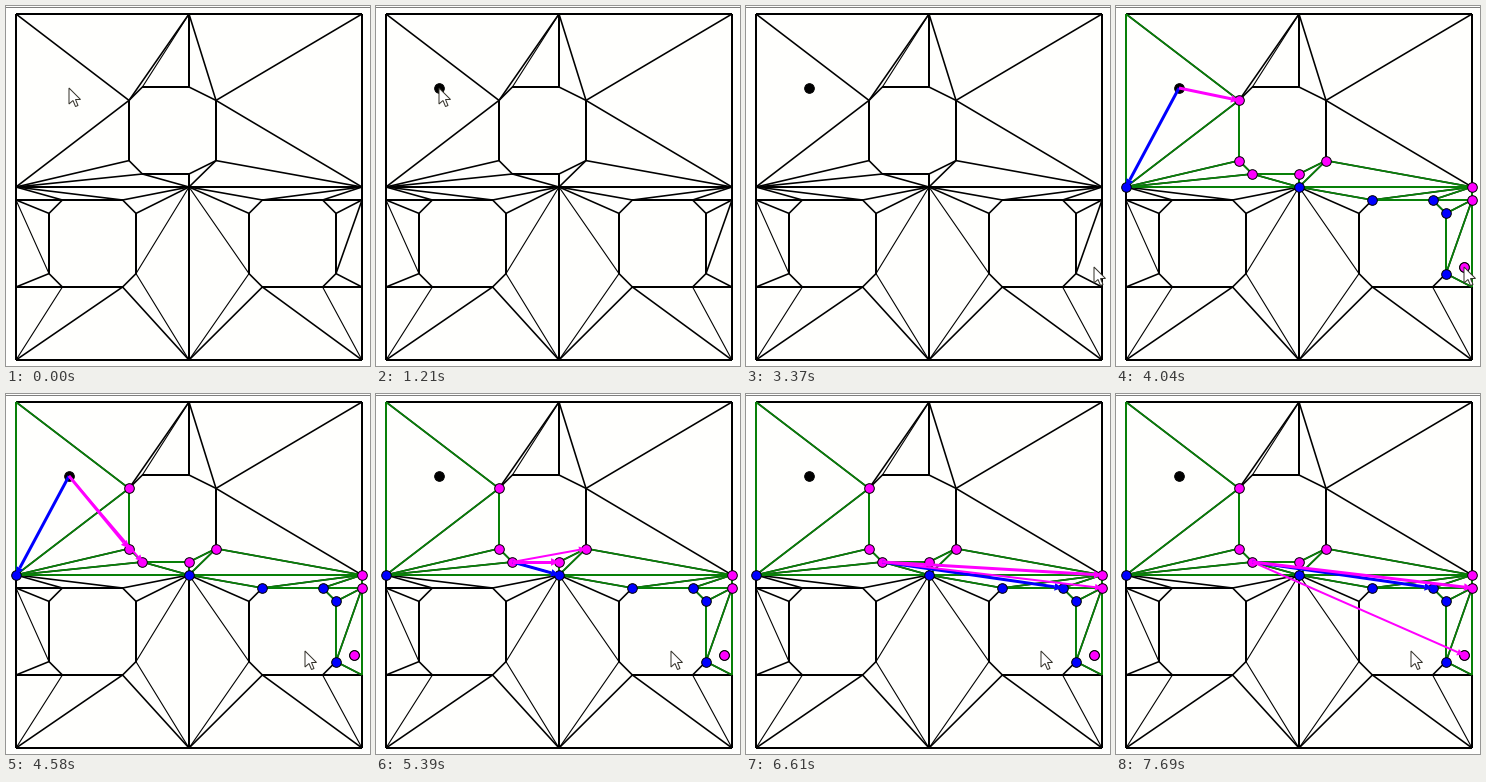
Animation of 364x360 px, one loop 8 s. Source, as a matplotlib script:

```python
import math
import matplotlib.pyplot as plt
from matplotlib.animation import FuncAnimation
from matplotlib.collections import LineCollection

W, H, DPI = 364, 360, 100
PX = 72 / DPI
LOOP, STEP = 8000, 20

PAPER, INK, GREEN = "#fffffd", "#000000", "#088008"
BLUE, PINK = "#0000ff", "#ff00ff"

START_AT, GOAL_AT, CORRIDOR_AT = 1210, 3420, 3690
PROBE_AT, PROBE_EVERY = 4056, 316

# The square is a 2 x 2 grid of nodes
X0, Y0, HALF = 10, 8, 173
(TL, TM, TR), (ML, MID, MR), (BL, BM, BR) = [
    [(X0 + c * HALF, Y0 + r * HALF) for c in range(3)] for r in range(3)]
START, GOAL = (63, 82), (348, 261)


def octagon(x, y, right_cut=13.4, size=87, cut=13.4):
    """Bevelled square, clockwise from the upper left side."""
    r, b = x + size, y + size
    return [(x, y + cut), (x + cut, y), (r - right_cut, y), (r, y + cut),
            (r, b - cut), (r - right_cut, b), (x + cut, b), (x, b - cut)]


TOP = octagon(123, 81, right_cut=27)
LEFT, RIGHT = octagon(43, 194), octagon(243, 194)
(LU, LD), (RU, RD) = [[(x, y) for y in (194, 281)] for x in (ML[0], MR[0])]


def chain(*points):
    return list(zip(points, points[1:]))


def ring(points):
    return chain(*points, points[0])


def fan(hub, *points):
    return [(hub, p) for p in points]


THICK = (
    ring([TL, TR, BR, BL]) + ring(TOP) + ring(LEFT) + ring(RIGHT)
    + chain(ML, MID, MR) + chain(MID, BM)
    + fan(TOP[0], TL, ML, TM) + fan(TM, TOP[2], TOP[3])
    + fan(TOP[3], TR, MR) + fan(ML, TOP[7], TOP[6], LEFT[1], LEFT[2])
    + fan(MID, *TOP[4:7], *LEFT[2:4], *RIGHT[:2])
    + fan(MR, TOP[4], *RIGHT[1:3])
    + fan(LU, *LEFT[:2]) + fan(LD, *LEFT[6:])
    + fan(RU, *RIGHT[2:5]) + fan(RD, *RIGHT[4:6])
    + fan(LEFT[5], BL, BM) + fan(RIGHT[6], BM, BR)
)
THIN = (
    chain(TM, TOP[1]) + chain(LU, LEFT[7]) + chain(BL, LEFT[6])
    + chain(BR, RIGHT[5]) + fan(LEFT[4], MID, BM) + fan(RIGHT[7], MID, BM)
)

# Each new corner replaces the pink or the blue end of the previous portal
BLUE_NODES = [ML, MID, *RIGHT[1:5]]
CORNERS = [TOP[7], TOP[6], MID, TOP[5], TOP[4], MR, *RIGHT[1:3],
           RU, *RIGHT[3:5], GOAL]
PORTALS = [(TOP[0], ML)]
for corner in CORNERS:
    pink, blue = PORTALS[-1]
    PORTALS.append((pink, corner) if corner in BLUE_NODES else (corner, blue))
PINK_NODES = [TOP[0]] + [c for c in CORNERS if c not in BLUE_NODES]
CORRIDOR = (PORTALS[:-1] + chain(*PINK_NODES[:-1]) + chain(*BLUE_NODES)
            + chain(TOP[0], TL, ML) + chain(RIGHT[4], RD, RU))


def cross(origin, a, b):
    return ((a[0] - origin[0]) * (b[1] - origin[1])
            - (a[1] - origin[1]) * (b[0] - origin[0]))


def funnel_steps():
    """String pulling: yields apex, pink side, blue side, probe, its colour."""
    apex, sides, i = START, list(PORTALS[0]), 1
    yield apex, *sides, None, None
    while True:
        side = int(PORTALS[i][0] == PORTALS[i - 1][0])
        probe, other = PORTALS[i][side], sides[1 - side]
        yield apex, *sides, probe, (PINK, BLUE)[side]
        if probe == GOAL:
            return
        sign = 1 - 2 * side
        if sign * cross(apex, sides[side], probe) >= 0:
            if sign * cross(apex, other, probe) > 0:
                # The sides crossed: restart just past the crossed corner
                apex = other
                i = 1 + max(k for k, p in enumerate(PORTALS)
                            if p[1 - side] == apex)
                sides = list(PORTALS[i])
            else:
                sides[side] = probe
        i += 1


FUNNEL = list(funnel_steps())

# Pointer moves: begin, end, destination
MOVES = [(1800, 2560, (332, 283)), (2610, 3370, GOAL), (4130, 4720, (295, 257))]
POINTER = [(0, 0), (0, 16), (4, 12.5), (6.5, 18.5),
           (9, 17.5), (6.5, 11.5), (11.5, 11.5)]

fig = plt.figure(figsize=(W / DPI, H / DPI), dpi=DPI, facecolor=PAPER)
ax = fig.add_axes([0, 0, 1, 1])
ax.set_xlim(0, W)
ax.set_ylim(H, 0)
ax.axis("off")


def draw_edges(edges, color, slanted, z):
    """Level and upright edges are two pixels wide, the others `slanted`."""
    widths = [(2 if a[0] == b[0] or a[1] == b[1] else slanted) * PX
              for a, b in edges]
    return ax.add_collection(
        LineCollection(edges, colors=color, linewidths=widths, zorder=z))


def draw_nodes(points, color):
    return ax.plot(*zip(*points), "o", ms=9.6 * PX, mfc=color, mec=INK,
                   mew=PX, zorder=5)[0]


class Arrow:
    def __init__(self, width, z):
        self.size = 5 + width
        self.shaft, = ax.plot([], [], lw=width * PX, zorder=z,
                              solid_capstyle="butt")
        self.head = ax.fill([0, 0, 0], [0, 0, 0], lw=0, zorder=z)[0]

    def show(self, tail, tip, color):
        length = math.dist(tail, tip)
        ux, uy = (tip[0] - tail[0]) / length, (tip[1] - tail[1]) / length
        bx, by = tip[0] - self.size * ux, tip[1] - self.size * uy
        half = self.size * 0.48
        self.shaft.set_data([tail[0], bx], [tail[1], by])
        self.head.set_xy([tip, (bx - half * uy, by + half * ux),
                          (bx + half * uy, by - half * ux)])
        for part in (self.shaft, self.head):
            part.set(color=color, visible=True)

    def hide(self):
        self.shaft.set_visible(False)
        self.head.set_visible(False)


# Dotted frame along the top and the right
ax.plot([0, W - 0.5, W - 0.5], [0.5, 0.5, H], color=INK, lw=PX,
        ls=(0, (1, 1)), dash_capstyle="butt")
draw_edges(THICK, INK, 1.6, 1)
draw_edges(THIN, INK, 1.1, 1)
corridor = [draw_edges(CORRIDOR, GREEN, 1.7, 3),
            draw_nodes(PINK_NODES, PINK), draw_nodes(BLUE_NODES, BLUE)]
start_dot, goal_dot = draw_nodes([START], INK), draw_nodes([GOAL], INK)
goal_dot.set_zorder(4)
blue_side, pink_side, probe_arrow = Arrow(3, 6), Arrow(3, 7), Arrow(2, 8)
pointer = ax.fill(*zip(*POINTER), fc="white", ec="#34322a",
                  lw=PX, zorder=10)[0]


def pointer_position(t):
    x, y = START
    for begin, end, (to_x, to_y) in MOVES:
        u = min(max((t - begin) / (end - begin), 0), 1)
        ease = u ** 3 * (10 - 15 * u + 6 * u * u)
        x += (to_x - x) * ease
        y += (to_y - y) * ease
    return round(x), round(y)


def show_funnel(t):
    for arrow in (blue_side, pink_side, probe_arrow):
        arrow.hide()
    if t < CORRIDOR_AT:
        return
    step = max(0, 1 + math.floor((t - PROBE_AT) / PROBE_EVERY))
    apex, pink, blue, probe, color = FUNNEL[min(step, len(FUNNEL) - 1)]
    blue_side.show(apex, blue, BLUE)
    pink_side.show(apex, pink, PINK)
    if probe:
        probe_arrow.show(apex, probe, color)


def update(i):
    t = i * STEP + STEP / 2
    start_dot.set_visible(t >= START_AT)
    goal_dot.set_visible(t >= GOAL_AT)
    for part in corridor:
        part.set_visible(t >= CORRIDOR_AT)
    show_funnel(t)
    x, y = pointer_position(t)
    pointer.set_xy([(x + dx, y + dy) for dx, dy in POINTER])
    return []


anim = FuncAnimation(fig, update, frames=LOOP // STEP, interval=STEP,
                     repeat=True, repeat_delay=0, blit=False)
plt.show()
```
